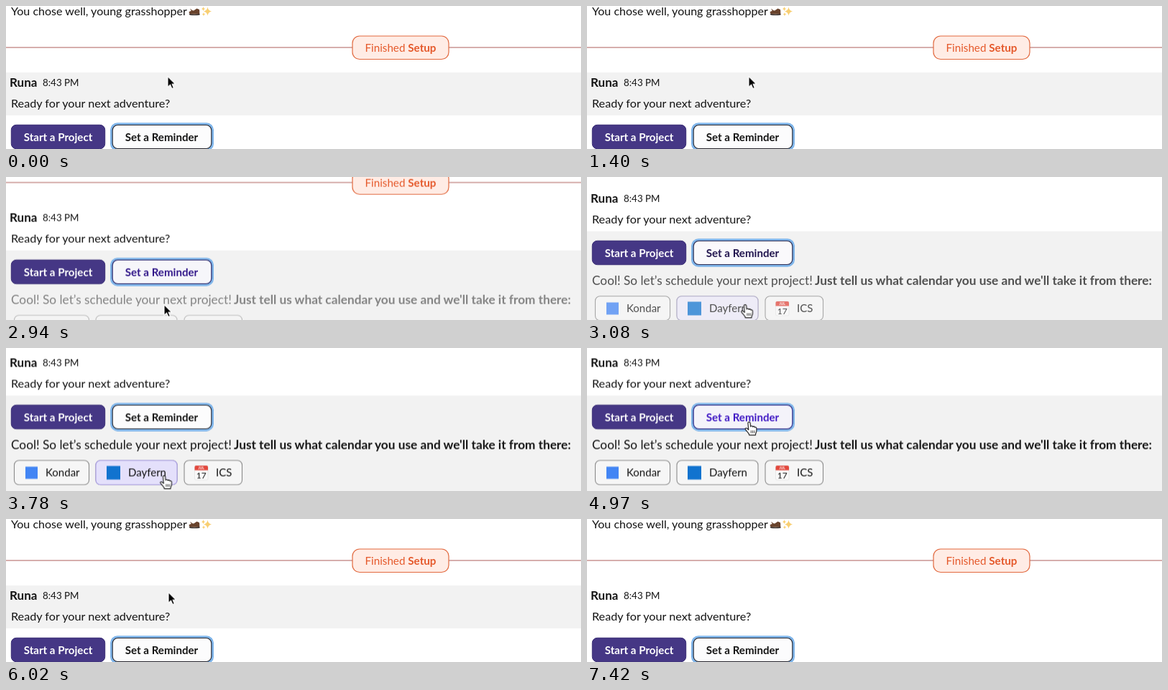
An HTML page that plays this animation: 800 by 200 pixels, repeating every 7.49 s.

```html
<!DOCTYPE html>
<html lang="en">
<head>
<meta charset="utf-8">
<title>Calendar chat</title>
<style>
html, body { margin: 0; width: 100%; height: 100%; overflow: hidden; background: #fff; }
svg { display: block; width: 800px; height: 200px; }
text { font: 16.2px Lato, sans-serif; fill: #141414; }
.b { font-weight: 700; }
.btn { font-size: 15.1px; font-weight: 700; text-anchor: middle; }
.cal { font-size: 15px; }
.msg { font-size: 17.26px; }
.chip { fill: #f6f6f6; stroke: #8b8b8b; stroke-width: 1.1; }

/* One shared 7490 ms loop */
.a { animation: 7490ms ease-in-out infinite; }
.cut { animation-timing-function: step-end; }
.fade { animation-timing-function: linear; }
#page { animation-name: scroll; }
#reply { animation-name: reply; }
#cursor { animation-name: move; }
#arrow { animation-name: arrow; }
#hand { animation-name: hand; }
#rowTop { animation-name: rowTop; }
#rowLow { animation-name: rowLow; }
#setHover { animation-name: setHover; }
#calHover { animation-name: calHover; }

@keyframes scroll {
  0%, 34.66% { transform: translateY(0); }
  43.07%, 76.64% { transform: translateY(-86.5px); }
  79.84%, 100% { transform: translateY(0); }
}
@keyframes reply {
  0%, 35.25% { opacity: 0; }
  43.26%, 76.64% { opacity: 1; }
  78.77%, 100% { opacity: 0; }
}
@keyframes move {
  0%, 20.03% { transform: translate(225px, 98.5px); }
  27.77%, 56.74% { transform: translate(220px, 178.5px); }
  64.09%, 76.64% { transform: translate(225.5px, 103.5px); }
  79.84%, 86.25% { transform: translate(226px, 102.5px); }
  95.46%, 100% { transform: translate(222px, 215px); }
}
@keyframes arrow {
  0%, 37.4%, 59.5%, 77.8% { opacity: 1; }
  25.6%, 40.1%, 62.1%, 91.2%, 100% { opacity: 0; }
}
@keyframes hand {
  0%, 37.4%, 59.5%, 77.8% { opacity: 0; }
  25.6%, 40.1%, 62.1%, 91.2%, 100% { opacity: 1; }
}
@keyframes rowTop {
  0%, 78.1% { opacity: 1; }
  24.67%, 90.6%, 100% { opacity: 0; }
}
@keyframes rowLow {
  0%, 78.1%, 93.1%, 100% { opacity: 0; }
  24.67%, 90.6% { opacity: 1; }
}
@keyframes setHover {
  0%, 25.6% { opacity: 0; }
  27.8%, 37.4% { opacity: 1; }
  43%, 62.1% { opacity: 0; }
  64.1%, 77.8% { opacity: 1; }
  79.8%, 91.2% { opacity: 0; }
  93.1% { opacity: 1; }
  95.5%, 100% { opacity: 0; }
}
@keyframes calHover {
  0%, 40.1% { opacity: 0; }
  42.1%, 59.5% { opacity: 1; }
  61.5%, 100% { opacity: 0; }
}
</style>
</head>
<body>
<svg viewBox="0 0 800 200">
  <g id="page" class="a">
    <rect id="rowTop" class="a cut" y="93" width="800" height="60" fill="#f2f2f2"/>
    <rect id="rowLow" class="a cut" y="153" width="800" height="220" fill="#f2f2f2"/>

    <text x="7" y="13" style="font-size:16.05px">You chose well, young grasshopper</text>
    <!-- boot -->
    <path d="M256 3.5q2.500 2.500 5 3l4.500-3 3.500 1.500q.5 3 .2 6.500h-12q-3-1.500-2.500-3.500l3-1.200z" fill="#69432c"/>
    <path d="M254.500 10.500q7 2.200 15 .3v1.800q-8 1-14 0z" fill="#2b211d"/>
    <!-- sparkles -->
    <path d="M280.500 1.500q.8 5 5.500 6-4.700 1-5.500 6-.8-5-5.500-6 4.700-1 5.500-6zM274.500 1q.4 2.500 2.500 3-2.100.5-2.500 3-.4-2.500-2.500-3 2.100-.5 2.500-3zM275 9q.4 2 2 2.500-1.600.5-2 2.500-.4-2-2-2.500 1.600-.5 2-2.500z" fill="#f8cf72"/>

    <path d="M0 58H800" stroke="#c99391" stroke-width="1.400"/>
    <rect x="482" y="42" width="134" height="32.500" rx="10" fill="#ffece5" stroke="#e2693f" stroke-width="1.200"/>
    <text x="549" y="64" style="font-size:15.200px;fill:#e5592b;text-anchor:middle">Finished <tspan class="b">Setup</tspan></text>

    <text class="b" x="5" y="113.300" style="font-size:17px">Runa</text>
    <text x="51" y="112.300" style="font-size:13.400px">8:43 PM</text>
    <text x="7" y="141.700">Ready for your next adventure?</text>

    <rect x="7.300" y="166.300" width="130.400" height="33.400" rx="7" fill="#453785" stroke="#372b73"/>
    <text class="btn" x="72.500" y="188.500" style="fill:#fff">Start a Project</text>

    <rect x="145" y="163.300" width="144" height="39.400" rx="10" fill="#7fb5ea"/>
    <rect x="148.200" y="166.500" width="137.600" height="33" rx="7.500" fill="#fcfcfd" stroke="#24232b" stroke-width="1.100"/>
    <text class="btn" x="216.500" y="188.500">Set a Reminder</text>
    <g id="setHover" class="a fade">
      <rect x="148.200" y="166.500" width="137.600" height="33" rx="7.500" fill="#f4f3fa" stroke="#3d3aa0" stroke-width="1.100"/>
      <text class="btn" x="216.500" y="188.500" style="fill:#3f18c4">Set a Reminder</text>
    </g>

    <g id="reply" class="a fade">
      <text class="msg" x="7" y="228">Cool! So let’s schedule your next project!</text>
      <text class="msg b" x="317" y="228">Just tell us what calendar you use and we'll take it from there:</text>

      <rect class="chip" x="11.500" y="243.700" width="104" height="34" rx="6.500"/>
      <rect x="27" y="252.500" width="17" height="17" fill="#4285f4"/>
      <text class="cal" x="55" y="266">Kondar</text>

      <rect class="chip" x="125" y="243.700" width="113" height="34" rx="6.500"/>
      <rect id="calHover" class="a fade" x="125" y="243.700" width="113" height="34" rx="6.500" fill="#e4e0fb" stroke="#a99de6" stroke-width="1.100"/>
      <rect x="140" y="251.500" width="19" height="19" fill="#1173cf"/>
      <text class="cal" x="170" y="266">Dayfern</text>

      <rect class="chip" x="248" y="243.700" width="80.500" height="34" rx="6.500"/>
      <rect x="262.500" y="251" width="18.500" height="20" rx="2" fill="#fafafa" stroke="#dcdcdc" stroke-width=".6"/>
      <path d="M262.500 257.500v-4.500q0-2 2-2h14.500q2 0 2 2v4.500z" fill="#e2483d"/>
      <text class="b" x="271.700" y="256.200" style="font-size:5px;fill:#fff;text-anchor:middle">JUL</text>
      <text x="271.700" y="268.500" style="font-size:12px;text-anchor:middle">17</text>
      <text class="cal" x="292" y="266">ICS</text>
    </g>
  </g>

  <g id="cursor" class="a">
    <path id="arrow" class="a cut" d="M0 0V15L3.500 11.700 5.900 17 8.400 15.900 6.100 10.800H10.700Z" stroke="#fff" stroke-width="1.100"/>
    <g id="hand" class="a cut" transform="translate(0 -.6) scale(1.080)" fill="#fff" stroke="#222" stroke-width="1.100" stroke-linejoin="round">
      <path d="M-1.500 1.900C-1.500.1 1.300.1 1.500 1.900L2 6.500C2.600 5.100 4.600 5.300 4.800 6.800 5.600 5.700 7.200 6 7.300 7.500 8.400 6.700 9.600 7.500 9.600 9V12C9.600 14 8.300 14.500 8.200 17.500H.3C0 15-2.500 13.500-4.600 10.300-5.600 8.700-3.600 7.700-2.500 8.900L-.7 10.600Z"/>
      <path d="M2.600 11.500V15M4.700 11.500V15M6.800 11.500V15" stroke-width=".8"/>
    </g>
  </g>
</svg>
</body>
</html>
```
